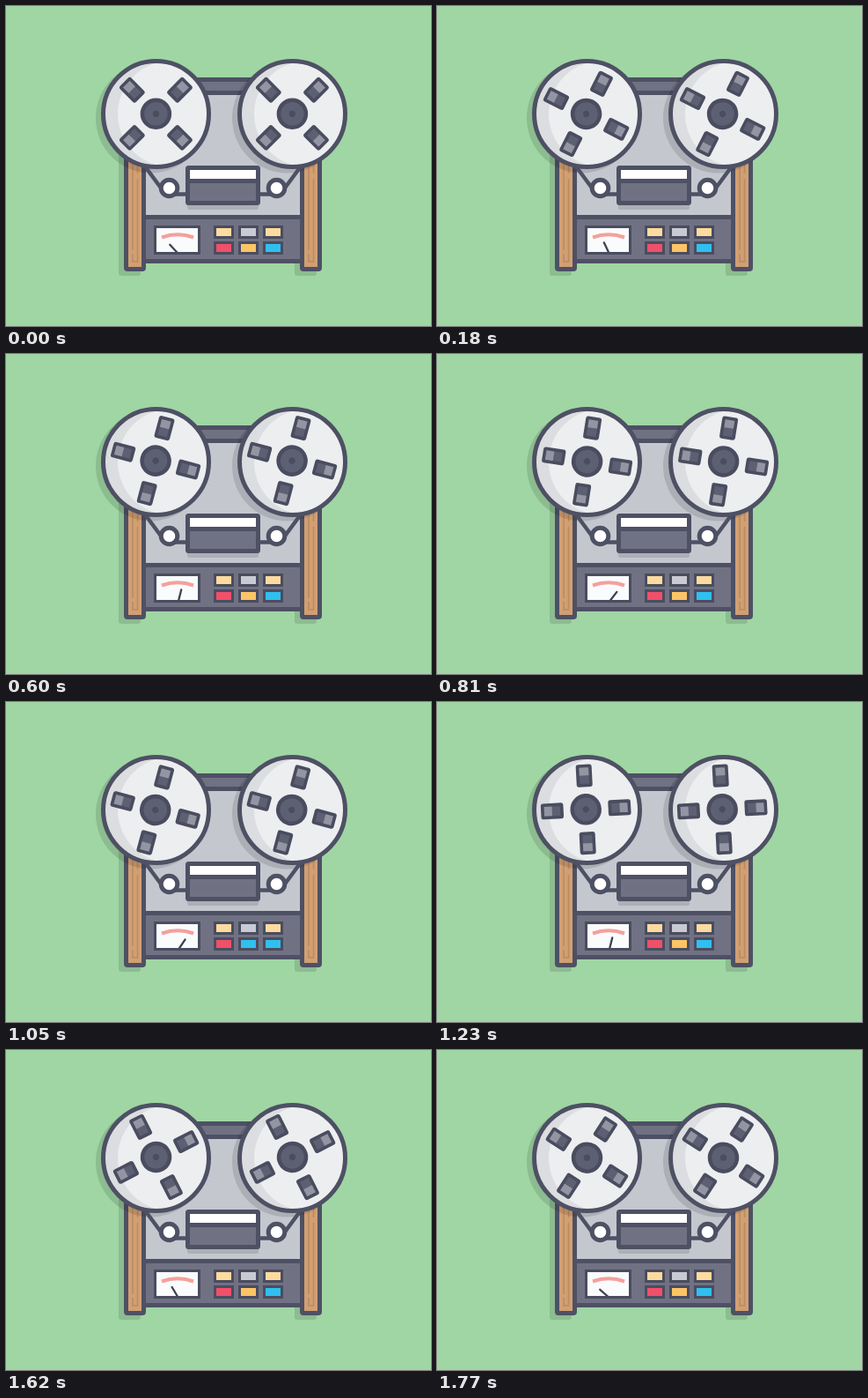
An HTML page for the animation above (1.8 s loop, 483 by 363 pixels).

```html
<!DOCTYPE html>
<html lang="en">
<head>
<meta charset="utf-8">
<title>Tape recorder</title>
<style>
  html, body { margin: 0; width: 100%; height: 100%; overflow: hidden; background: #9fd6a3; }
  svg { display: block; width: 483px; height: 363px; }
  .line { stroke: #4e5064; stroke-width: 5; }
  .thin { stroke: #4a4c5f; stroke-width: 3; }
  .shade { fill: #000; opacity: .12; }
  .slate { fill: #707283; }
  .wood { fill: #d19f72; }
</style>
</head>
<body>
<svg viewBox="0 0 483 363">
  <defs>
    <clipPath id="disc"><circle r="60"/></clipPath>
    <g id="slot">
      <rect x="-7.2" y="-49.3" width="14.4" height="22" rx="1" fill="#5d6072"/>
      <rect x="-6" y="-48" width="12" height="9.5" fill="#9495a3"/>
      <rect x="-7.2" y="-49.3" width="14.4" height="22" rx="1" fill="none" stroke="#4a4c5f" stroke-width="3.6"/>
    </g>
    <g id="spinner">
      <use href="#slot" transform="rotate(45)"/>
      <use href="#slot" transform="rotate(135)"/>
      <use href="#slot" transform="rotate(225)"/>
      <use href="#slot" transform="rotate(315)"/>
      <circle r="15.5" fill="#5d6072" stroke="#4a4c5f" stroke-width="4.5"/>
      <circle r="3.6" fill="#4a4c5f"/>
    </g>
    <g id="reel">
      <circle r="60" fill="#dcdde0"/>
      <circle cx="16.5" r="60" fill="#eceef0" clip-path="url(#disc)"/>
      <circle r="60" fill="none" class="line"/>
    </g>
    <g id="leg">
      <rect x="136.5" y="140" width="20" height="158.500" rx="1.500" class="wood line"/>
      <path d="M144 150V277M144 281V290H149.500V196M149.500 190V150" fill="none" stroke="#ba8a60" stroke-width="1.500"/>
    </g>
    <g id="roller">
      <path d="M158 182L178 209M186 213.500H206" fill="none" class="line" style="stroke-width:4.500"/>
      <circle cx="185.500" cy="206.500" r="9.300" fill="#fff" class="line"/>
    </g>
  </defs>

  <path class="shade" d="M128 140H153V297H328V140H353V303Q353 306 350 306H331Q328 306 328 303V297H153V303Q153 306 150 306H131Q128 306 128 303Z"/>

  <rect x="156.500" y="83.500" width="180" height="206" rx="2" fill="#c5c7cf" class="line"/>
  <rect x="156.500" y="83.500" width="180" height="15" class="slate line"/>
  <rect x="156.500" y="239.500" width="180" height="50" class="slate line"/>
  <use href="#leg"/>
  <use href="#leg" x="200"/>

  <circle class="shade" cx="164.500" cy="127" r="62.500"/>
  <circle class="shade" cx="319.500" cy="127" r="62.500"/>

  <use href="#roller"/>
  <use href="#roller" transform="matrix(-1 0 0 1 493 0)"/>
  <rect class="shade" x="206" y="222" width="81" height="9" rx="2"/>
  <rect x="206.500" y="183.500" width="80" height="40" rx="1" class="slate line"/>
  <rect x="209" y="186" width="75" height="10" fill="#fff"/>
  <path d="M206 198.500H287" class="line"/>

  <rect x="169.500" y="250.500" width="50" height="30" fill="#fafbfc"/>
  <path d="M177 262.500Q195 256 213 262.500" fill="none" stroke="#f4a09c" stroke-width="4"/>
  <path id="needle" d="M0 0V-14" stroke="#3f4152" stroke-width="2.300" stroke-linecap="round"/>
  <rect x="169.500" y="250.500" width="50" height="30" fill="none" class="thin"/>
  <g id="buttons"></g>

  <use href="#reel" x="170.500" y="122.500"/>
  <use href="#reel" x="325.500" y="122.500"/>
  <use href="#spinner" class="spin"/>
  <use href="#spinner" class="spin"/>
</svg>
<script>
  const LOOP = 1800, STEP = 30;
  const colors = ['#fddb9f', '#c9cad3', '#fddb9f', '#f0506a', '#fdc466', '#2fc0f0'];
  // Needle swing: [step, degrees]
  const swing = [[0, -43], [12, -8], [20, 14], [28, 41], [30, 42], [35, 34], [48, -9], [59, -49], [60, -43]];

  const needle = document.getElementById('needle');
  const spinners = document.querySelectorAll('.spin');
  const panel = document.getElementById('buttons');
  panel.innerHTML = colors.map((c, i) =>
    `<rect x="${237.5 + i % 3 * 28}" y="${250.5 + (i > 2) * 18}" width="20" height="12" fill="${c}" class="thin"/>`
  ).join('');
  const lamp = panel.children[4];

  function sample(keys, x) {
    const i = keys.findIndex(k => k[0] > x);
    const [x0, y0] = keys[i - 1], [x1, y1] = keys[i];
    return y0 + (y1 - y0) * (x - x0) / (x1 - x0);
  }

  function draw(now) {
    const step = Math.floor(now % LOOP / STEP);
    const turn = step * 12;
    // The reels sit slightly off their axis
    spinners.forEach((s, i) => s.setAttribute('transform',
      `translate(${169.9 + i * 155} 121.8) rotate(${turn}) translate(.5 .5)`));
    needle.setAttribute('transform', `translate(195.8 281) rotate(${sample(swing, step)})`);
    lamp.setAttribute('fill', colors[step >= 30 && step < 40 ? 5 : 4]);
  }

  const start = performance.now();
  function tick() {
    draw(performance.now() - start);
    requestAnimationFrame(tick);
  }
  tick();
</script>
</body>
</html>
```
